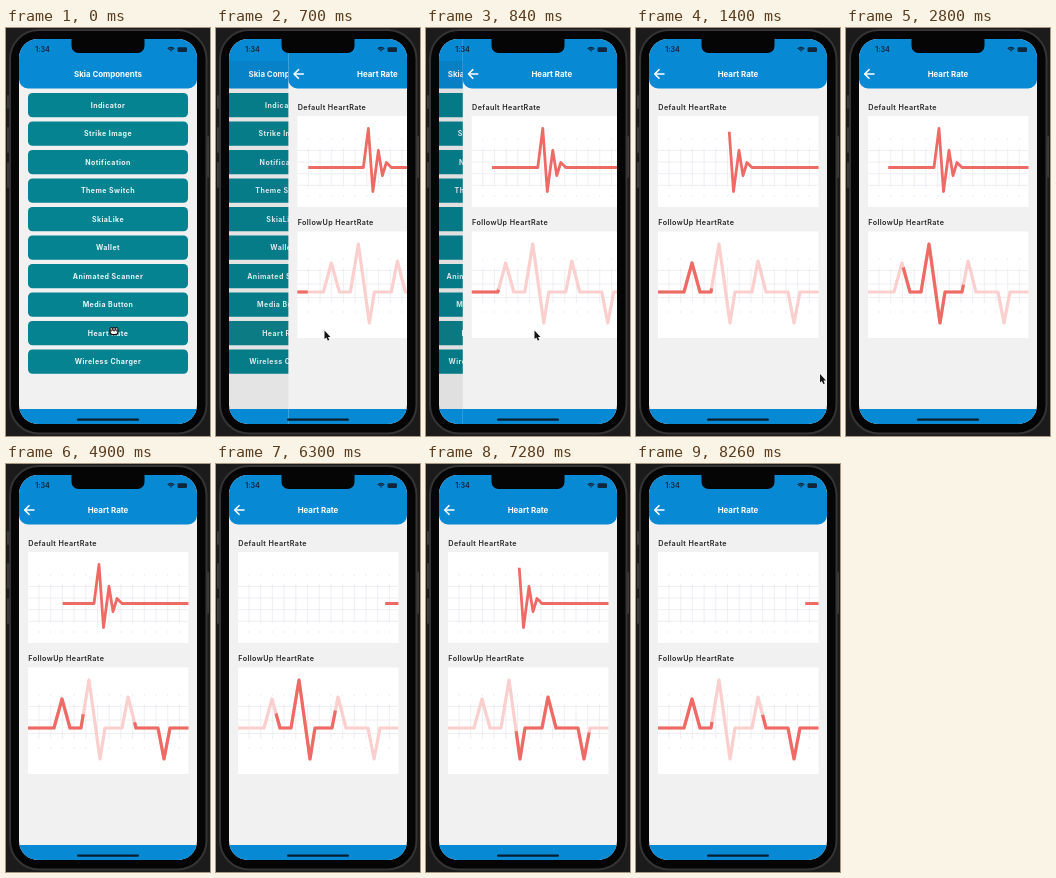
These frames come from a looping animation (204 by 408 pixels, 8.4 s). An HTML page with a canvas:

```html
<!DOCTYPE html>
<html lang="en">
<head>
<meta charset="utf-8">
<title>Heart rate demo</title>
<style>
html, body { margin: 0; width: 100%; height: 100%; overflow: hidden; background: #1b1b1b; }
canvas { display: block; width: 204px; height: 408px; }
</style>
</head>
<body>
<canvas id="stage"></canvas>
<script>
const LOOP = 8400;
const SCREEN = { x: 13, y: 11, w: 178, h: 385 };
const BLUE = '#0789d4', TEAL = '#058390', RED = '#ee6a64', PINK = '#fbcfce', PAGE = '#f1f1f1';
const MENU = ['Indicator', 'Strike Image', 'Notification', 'Theme Switch', 'SkiaLike', 'Wallet',
  'Animated Scanner', 'Media Button', 'Heart Rate', 'Wireless Charger'];
const PULSE = [[30.5, 139.5], [88, 139.5], [93, 100.5], [97.5, 163.5], [103, 122.5], [107, 147.5],
  [111, 134.5], [116, 139.5], [182.5, 139.5]];
const TRACE = [[22, 264], [48, 264], [56, 235], [64, 264], [75, 264], [83, 216], [94, 295], [99, 264],
  [116, 264], [122, 233], [130, 264], [152, 264], [158, 295], [164, 264], [182.5, 264]];

const canvas = document.getElementById('stage');
const ctx = canvas.getContext('2d');
const ratio = window.devicePixelRatio || 1;
canvas.width = 204 * ratio;
canvas.height = 408 * ratio;

const clamp = v => Math.max(0, Math.min(1, v));
const lengthOf = pts => pts.slice(1).reduce((sum, p, i) => sum + Math.hypot(p[0] - pts[i][0], p[1] - pts[i][1]), 0);
const PULSE_LEN = lengthOf(PULSE), TRACE_LEN = lengthOf(TRACE);

function box(x, y, w, h, radius, fill, stroke, lineWidth = 1) {
  ctx.beginPath();
  ctx.roundRect(x, y, w, h, radius);
  if (fill) { ctx.fillStyle = fill; ctx.fill(); }
  if (stroke) { ctx.strokeStyle = stroke; ctx.lineWidth = lineWidth; ctx.stroke(); }
}

function label(text, x, y, size, color, align = 'center', spacing = 0, weight = 700) {
  ctx.font = `${weight} ${size}px Inter, sans-serif`;
  ctx.letterSpacing = spacing + 'px';
  ctx.textAlign = align;
  ctx.textBaseline = 'middle';
  ctx.fillStyle = color;
  ctx.fillText(text, x, y);
}

function polyline(pts, color, width) {
  ctx.beginPath();
  pts.forEach(p => ctx.lineTo(...p));
  ctx.strokeStyle = color;
  ctx.lineWidth = width;
  ctx.lineJoin = 'round';
  ctx.stroke();
}

// Strokes only the stretch between two distances along the path.
function trimmed(pts, from, to, color, width) {
  if (to - from < 0.05) return;
  ctx.setLineDash([0, from, to - from, 2000]);
  polyline(pts, color, width);
  ctx.setLineDash([]);
}

function header(title) {
  box(13, 11, 178, 49.5, [0, 0, 9, 9], BLUE);
  label(title, 102, 46.5, 7.9, '#fff');
}

function footer() {
  ctx.fillStyle = BLUE;
  ctx.fillRect(13, 381, 178, 15);
}

function menuPage(pressed) {
  ctx.fillStyle = PAGE;
  ctx.fillRect(13, 11, 178, 385);
  header('Skia Components');
  MENU.forEach((name, i) => {
    const y = 65 + i * 28.5;
    const active = pressed && name === 'Heart Rate';
    box(22, y, 160, 24.2, 4.5, active ? '#0d828c' : TEAL);
    label(name, 102, y + 12.5, 7, '#e9f6f6', 'center', 0.45);
  });
  footer();
}

function grid(top, bottom, rows, gap) {
  ctx.strokeStyle = '#e8e8ef';
  ctx.lineWidth = 0.7;
  ctx.beginPath();
  for (let i = 0; i < rows; i++) {
    const y = top + 12.5 + i * gap;
    ctx.moveTo(22, y);
    ctx.lineTo(182, y);
  }
  for (let x = 33; x < 182; x += 11.7) {
    ctx.moveTo(x, top + 10);
    ctx.lineTo(x, bottom - 10);
    ctx.moveTo(x, top);
    ctx.lineTo(x, top + 2);
    ctx.moveTo(x, bottom - 2);
    ctx.lineTo(x, bottom);
  }
  ctx.stroke();
}

function drawPulse(t) {
  const u = Math.max(0, t - 640) / 1960 % 1;
  const quad = u < 0.5 ? 2 * u * u : 1 - 2 * (1 - u) ** 2;
  trimmed(PULSE, (0.8 * quad + 0.2 * u) * PULSE_LEN, PULSE_LEN, RED, 2.8);
}

function drawTrace(t) {
  polyline(TRACE, PINK, 3.2);
  const travelled = Math.max(0, t - 620) / 3420 * TRACE_LEN;
  const end = travelled % TRACE_LEN;
  const start = end - TRACE_LEN / 2;
  trimmed(TRACE, Math.max(0, start), end, RED, 3.2);
  if (start < 0 && travelled > TRACE_LEN) trimmed(TRACE, TRACE_LEN + start, TRACE_LEN, RED, 3.2);
}

function heartPage(t) {
  ctx.fillStyle = PAGE;
  ctx.fillRect(13, 11, 178, 385);
  header('Heart Rate');
  polyline([[28.5, 46], [19, 46]], '#fff', 1.6);
  polyline([[23.5, 41.2], [18.7, 46], [23.5, 50.8]], '#fff', 1.6);
  label('Default HeartRate', 22.3, 79.6, 7.2, '#262626', 'left', 0.4, 600);
  label('FollowUp HeartRate', 22.3, 194.5, 7.2, '#262626', 'left', 0.4, 600);
  ctx.fillStyle = '#fff';
  ctx.fillRect(22, 88, 160.5, 91);
  ctx.fillRect(22, 203.5, 160.5, 106.5);
  grid(110, 169, 4, 11.6);
  grid(230, 285, 3, 13.5);
  drawPulse(t);
  drawTrace(t);
  footer();
}

function statusBar() {
  box(65.5, 5, 73, 20, 7, '#050506');
  label('1:34', 36.5, 21.7, 7.2, '#10263a', 'center', 0, 600);
  ctx.strokeStyle = '#10263a';
  ctx.lineWidth = 1.1;
  for (const r of [1.2, 3, 4.6]) {
    ctx.beginPath();
    ctx.arc(165, 24, r, -Math.PI * 0.75, -Math.PI * 0.25);
    ctx.stroke();
  }
  box(171.5, 19.2, 9.5, 4.8, 1.3, '#10263a');
  box(71, 390.6, 62, 2.2, 1.1, '#071f31');
}

function phoneBody() {
  ctx.fillStyle = '#1b1b1b';
  ctx.fillRect(0, 0, 204, 408);
  for (const [x, y, h] of [[1, 67, 14], [1, 99, 26], [1, 134, 26], [201, 108, 42]]) box(x, y, 2, h, 1, '#3a3a3a');
  box(4, 2, 196.5, 403.5, 29, '#050506', '#343435', 2);
}

function hand(x, y) {
  box(x - 4, y - 2.8, 8, 6.5, 3, '#fff', '#111', 1.2);
  for (const dx of [-2.8, 0, 2.8]) box(x + dx - 1, y - 3.6, 2, 3.6, 1, '#eee', '#111', 1);
}

function arrow(x, y) {
  const shape = [[0, 0], [0, 8.6], [1.9, 6.9], [3.3, 10], [4.8, 9.4], [3.5, 6.4], [6, 6.4]];
  ctx.beginPath();
  shape.forEach(([dx, dy]) => ctx.lineTo(x + dx, y + dy));
  ctx.closePath();
  ctx.fillStyle = '#151515';
  ctx.strokeStyle = '#fff';
  ctx.lineWidth = 0.9;
  ctx.stroke();
  ctx.fill();
}

function pointer(t) {
  if (t < 560) return hand(108, 303);
  const u = clamp((t - 900) / 500);
  const out = u * u * (3 - 2 * u);
  const leave = Math.max(0, t - 1480) / 260;
  if (leave < 1.4) arrow(108.5 + 75.5 * out + 18 * leave, 302.5 + 43.5 * out + 60 * leave);
}

function render(t) {
  ctx.setTransform(ratio, 0, 0, ratio, 0, 0);
  phoneBody();
  ctx.save();
  ctx.beginPath();
  ctx.roundRect(SCREEN.x, SCREEN.y, SCREEN.w, SCREEN.h, 19);
  ctx.clip();
  const eased = t < 533 ? 0 : 1 - Math.exp((533 - t) / 153);
  const slide = eased > 0.99 ? 1 : eased;
  if (slide < 1) {
    ctx.save();
    ctx.translate(-0.3 * SCREEN.w * slide, 0);
    menuPage(t >= 140);
    ctx.restore();
    ctx.fillStyle = `rgba(0,0,0,${0.08 * slide})`;
    ctx.fillRect(13, 33, 178, 348);
  }
  if (slide > 0) {
    ctx.save();
    ctx.translate(SCREEN.w * (1 - slide), 0);
    heartPage(t);
    ctx.restore();
  }
  statusBar();
  ctx.restore();
  pointer(t);
}

function tick(now) {
  render(now % LOOP);
  requestAnimationFrame(tick);
}
render(0);
requestAnimationFrame(tick);
</script>
</body>
</html>
```
